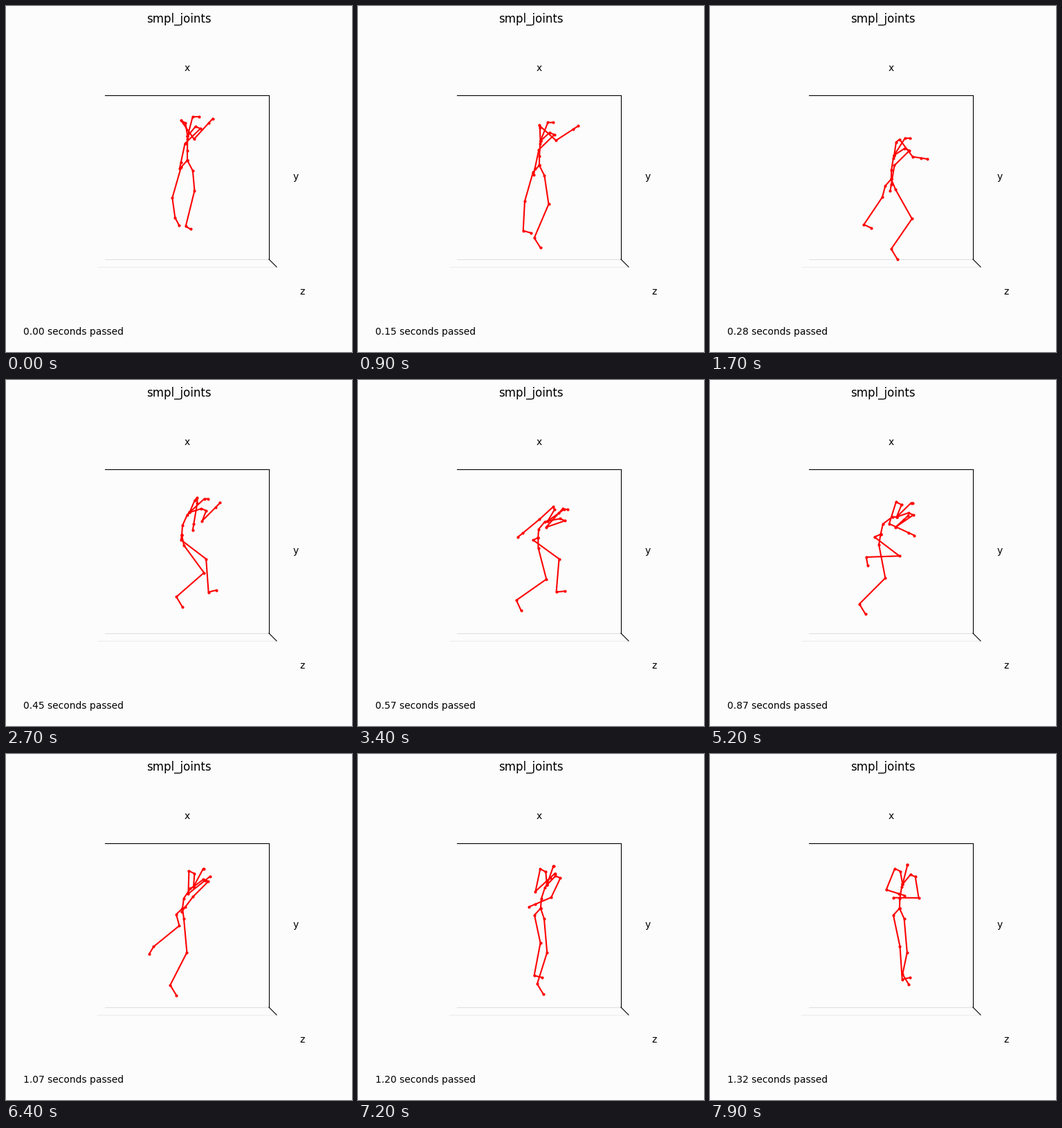
A matplotlib script for the animation above (8000 ms loop, 500x500 px).

```python
import matplotlib.pyplot as plt
import numpy as np
from matplotlib.animation import FuncAnimation

FRAMES, STEP, FPS = 80, 100, 60
RED, BACK = "#ff0000", "#fcfcfc"


def polar(length, deg):
    """Bone vector in pixels; 0 degrees hangs down, 90 points right."""
    a = np.radians(deg)
    return np.array([length * np.sin(a), length * np.cos(a)])


def chain(start, *bones):
    return np.cumsum([start, *bones], axis=0)


def pose(s):
    """Joint chains of the runner at s seconds into the loop."""

    def bump(mid, width):
        return np.exp(-((s - mid) / width) ** 2)

    def step(mid, width):
        return (1 + np.tanh((s - mid) / width)) / 2

    # Torso: the pelvis dips twice while the back leans in and straightens.
    pelvis = np.array([
        262 - 8 * bump(2.7, 0.5) - 16 * bump(5.4, 1.1) + 12 * bump(7.9, 0.6),
        223 + 28 * bump(1.6, 0.6) + 20 * bump(4, 0.5)])
    lean = 44 * bump(4.8, 2.3)
    back = polar(35 - 15 * bump(4, 0.7), 180 - lean)
    bow = polar(0.18 * lean, -90 - lean)
    chest = pelvis + back
    nod = 10 + 46 * bump(3.9, 2.6)
    neck = chest + polar(29, 180 - nod)
    spine = np.array([pelvis, pelvis + 0.39 * back + bow,
                      pelvis + 0.88 * back + 0.6 * bow,
                      chest, neck, neck + (9 - 1.2 * s, 0)])

    # Arms: collar, shoulder, elbow, wrist, hand.
    fore = 140 - 192 * bump(3.55, 1.7) - 70 * bump(8, 0.5)
    arm_a = chain(
        chest,
        polar(19, 204 - nod),
        (14 * bump(2.1, 1.4) - 8, -4),
        polar(33 - 25 * bump(2.7, 0.6),
              48 * bump(0.9, 1.6) - 74 * bump(4, 1) - 22 * bump(7.9, 0.9)),
        polar(31 - 19 * bump(1.7, 0.5) - 12 * bump(7.9, 0.5), fore),
        polar(9, fore))

    fore = -12 + 150 * step(2.2, 0.25) - 180 * step(5.8, 0.35) - 50 * step(7.2, 0.4)
    arm_b = chain(
        chest,
        polar(18, 155 - nod),
        (7, 3),
        polar(31 - 15 * bump(2.7, 0.5),
              -46 + 27 * bump(2.7, 0.5) - 62 * bump(4.1, 0.8) + 56 * bump(8, 0.8)),
        polar(28 - 14 * bump(5.6, 1.2), fore),
        polar(9, fore))

    # Legs: hip, knee, ankle, foot.
    shin = 8 - 43 * bump(1.6, 0.6) - 98 * bump(5.4, 1.4)
    leg_a = chain(
        pelvis,
        (8 * bump(2.7, 0.6) - 9, 10 - 9 * bump(4.3, 1.5)),
        polar(46 - 29 * bump(1.7, 0.5) - 29 * bump(6.4, 0.6),
              -16 + 70 * step(2.2, 0.25) - 42 * step(5.9, 0.4)),
        polar(48 - 19 * bump(0, 0.8), shin),
        polar(12, shin + 100 - 80 * bump(0, 0.8) - 80 * bump(6.4, 0.6)))

    leg_b = chain(
        pelvis,
        (8 - 11 * bump(4.7, 2.2), 15),
        polar(49 - 20 * bump(0, 0.9) - 10 * bump(4, 0.5),
              5 + 38 * bump(2.3, 0.9) + 8 * bump(4.7, 0.9)),
        polar(53 - 21 * bump(7.9, 0.6), -6 - 50 * bump(3.8, 2.8)),
        polar(17 - 8 * bump(4, 0.4) - 9 * bump(0, 0.5),
              31 - 58 * bump(4, 0.4) + 28 * bump(0, 0.5)))

    return spine, arm_a, arm_b, leg_a, leg_b


plt.rcParams["font.family"] = "DejaVu Sans"
fig = plt.figure(figsize=(5, 5), dpi=100, facecolor=BACK)
fig.suptitle("smpl_joints", fontsize=12)
ax = fig.add_axes([0, 0, 1, 1])
ax.set(xlim=(0, 500), ylim=(500, 0))
ax.axis("off")

# Box edges: two faint floor lines, then the dark frame.
ax.plot([132, 391], [377, 377], color="#ececec", lw=0.8)
ax.plot([143, 380], [366, 366], color="#e0e0e0", lw=0.8)
for xs, ys in [((143, 380), (129, 129)), ((380, 380), (129, 366)), ((380, 391), (366, 377))]:
    ax.plot(xs, ys, color="black", lw=0.8)
for name, x, y in [("x", 261.5, 90), ("y", 418.5, 247), ("z", 428, 413)]:
    ax.text(x, y, name, fontsize=10, ha="center", va="center")

clock = fig.text(0.05, 0.05, "", fontsize=10)
bones = [ax.plot([], [], "o-", color=RED, lw=1.5, ms=3, mew=0, zorder=3)[0]
         for _ in pose(0)]


def draw(n):
    for line, joints in zip(bones, pose(n * STEP / 1000)):
        line.set_data(joints[:, 0], joints[:, 1])
    clock.set_text(f"{n / FPS:.2f} seconds passed")
    return [*bones, clock]


anim = FuncAnimation(fig, draw, frames=FRAMES, interval=STEP, repeat=True, repeat_delay=0)
plt.show()
```
